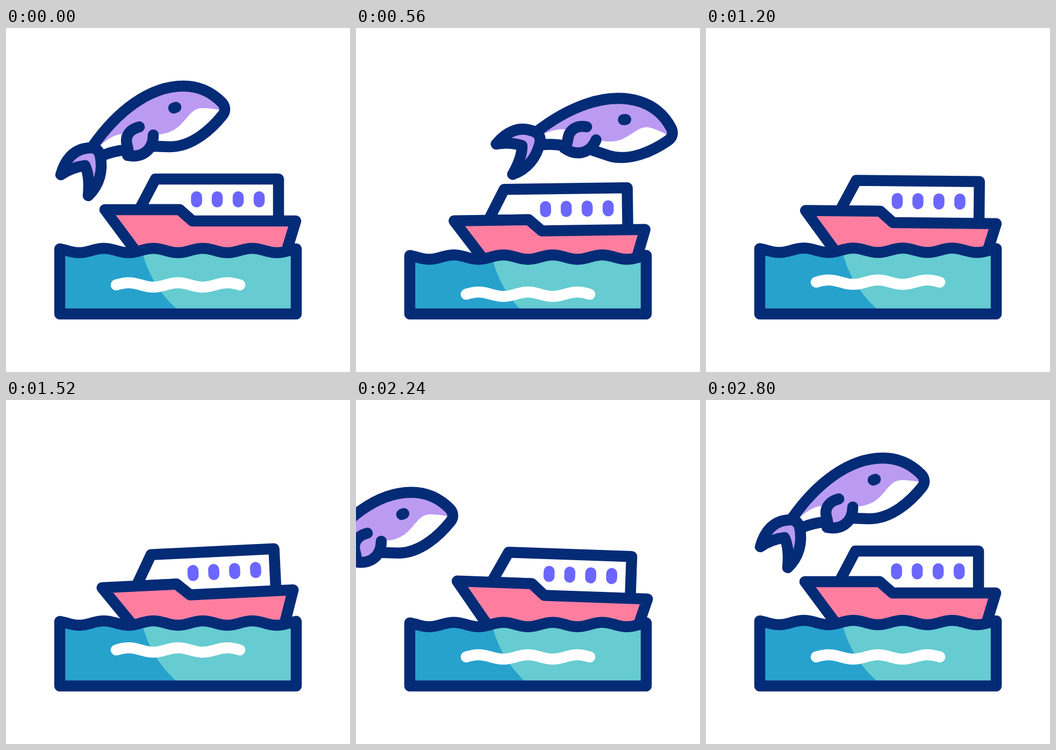
Recreate the animation shown at these times as an HTML page with a canvas. Size 640x640 px, loop 2.84 s.

```html
<!DOCTYPE html>
<html lang="en">
<head>
<meta charset="utf-8">
<title>Whale and boat</title>
<style>
  html, body { margin: 0; width: 100%; height: 100%; overflow: hidden; background: #fff; }
  canvas { display: block; width: 640px; height: 640px; }
</style>
</head>
<body>
<canvas id="stage" width="640" height="640"></canvas>
<script>
const ctx = document.getElementById('stage').getContext('2d');
const LOOP = 2840;
const NAVY = '#042b76', PURPLE = '#bb9af2', PINK = '#ff7ea0', BLUE = '#27a2cd',
      TEAL = '#66ccd1', VIOLET = '#6b66ff', WHITE = '#fff';

// Motion keys: [time, value], smooth between neighbours
const boatTilt = [[0, 0], [360, -1.7], [1000, 2.2], [1520, -2.75], [2240, 2], [2560, 0], [LOOP, 0]];
const boatDrop = [[0, 0], [640, 19], [1360, 1], [1960, 10], [2520, 0], [LOOP, 0]];
const tide = [[0, 0], [500, 13], [940, -1.5], [1460, 0.6], [1960, 10], [2440, 0], [LOOP, 0]];
const ripple = [[0, 0], [600, 17.5], [1500, -13], [1960, 0], [LOOP, 0]];
const flap = [[0, 0], [600, 7.6], [1240, 0], [LOOP, 0]];

function valueAt(keys, t) {
  const i = keys.findIndex(key => key[0] > t);
  const [t0, a] = keys[i - 1], [t1, b] = keys[i];
  const s = (t - t0) / (t1 - t0);
  return a + (b - a) * s * s * (3 - 2 * s);
}

const cabin = new Path2D('M248 338L278 281H507V360H345L323 338Z');
const hull = new Path2D('M184 338H323L347 359H539L511 451H268Z');
const windows = new Path2D('M354.5 314v9.5M393 314v9.5M432 314v9.5M471 314v9.5');
const shallows = new Path2D('M250 400C258 446 281 490 316 521L345 545H560V380H250Z');

const back = 'M162 219C205 158 265 108 330 108C365 108 388 125 401 138C408 145 409 155 403 162';
const belly = 'C383 187 347 221 305 221L275 220';
const underTail = 'M180 237C195 231 208 228 222 227';
const body = new Path2D(back + belly + 'L222 227C208 228 195 231 180 237Z');
const bodyLine = new Path2D(back + belly + underTail);
const bodyTop = new Path2D(back +
  'L402 153Q380 149 365 149C334 149 335 195 283 198L245 205L216 197C200 199 185 208 168 226Z');
const fluke = new Path2D('M102 273C109 248 125 222 160 223Q171 224 175 236' +
  'C181 265 174 292 153 312C155 290 154 270 147 256C130 258 115 264 102 273Z');
const flipper = new Path2D('M248 184C232 188 224 198 224 210C224 220 230 226 226 237C250 242 274 230 274 199');
const eye = new Path2D('M312 149L316 147.5');

function fill(path, color) {
  ctx.fillStyle = color;
  ctx.fill(path);
}

function stroke(path, color = NAVY) {
  ctx.strokeStyle = color;
  ctx.stroke(path);
}

// Runs paint() with the picture turned around a point
function turned(x, y, degrees, paint) {
  ctx.save();
  ctx.translate(x, y);
  ctx.rotate(degrees * Math.PI / 180);
  ctx.translate(-x, -y);
  paint();
  ctx.restore();
}

function wave(from, to, y, crest) {
  const path = new Path2D();
  for (let x = from; x <= to; x += 2) {
    path.lineTo(x, y - 4 * Math.cos((x - crest) * Math.PI / 46));
  }
  return path;
}

function outlined(path, color) {
  fill(path, color);
  stroke(path);
}

function drawBoat(t) {
  ctx.save();
  ctx.translate(0, valueAt(boatDrop, t));
  turned(362, 454, valueAt(boatTilt, t), () => {
    outlined(cabin, WHITE);
    stroke(windows, VIOLET);
    outlined(hull, PINK);
  });
  ctx.restore();
}

function drawWater(t) {
  const level = valueAt(tide, t);
  const box = wave(100, 540, 414 + level, 182);
  box.lineTo(540, 532);
  box.lineTo(100, 532);
  box.closePath();
  fill(box, BLUE);
  ctx.save();
  ctx.clip(box);
  ctx.translate(0, level);
  fill(shallows, TEAL);
  ctx.restore();
  stroke(box);
  stroke(wave(205, 435, 478 + valueAt(ripple, t), 228), WHITE);
}

// Leaps away to the right while turning, then glides in from the left
function whalePose(t) {
  if (t < 1400) {
    const q = (t / 560) ** 2.25;
    return { x: 185 * q, y: 22 * q ** 2, turn: 16.5 * q };
  }
  const q = ((LOOP - t) / 360) ** 2;
  return { x: -82 * q, y: 8 * q ** 2.04, turn: 0 };
}

function drawWhale(t) {
  const { x, y, turn } = whalePose(t);
  const swing = valueAt(flap, t);
  ctx.save();
  ctx.translate(x, y);
  turned(314, 148, turn, () => {
    fill(body, WHITE);
    fill(bodyTop, PURPLE);
    stroke(bodyLine);
    turned(199, 236, swing, () => outlined(fluke, PURPLE));
    turned(270, 199, swing, () => outlined(flipper, PURPLE));
    stroke(eye);
  });
  ctx.restore();
}

function draw() {
  const t = performance.now() % LOOP;
  ctx.clearRect(0, 0, 640, 640);
  ctx.lineCap = ctx.lineJoin = 'round';
  ctx.lineWidth = 20.5;
  drawBoat(t);
  drawWater(t);
  drawWhale(t);
  requestAnimationFrame(draw);
}
draw();
</script>
</body>
</html>
```
